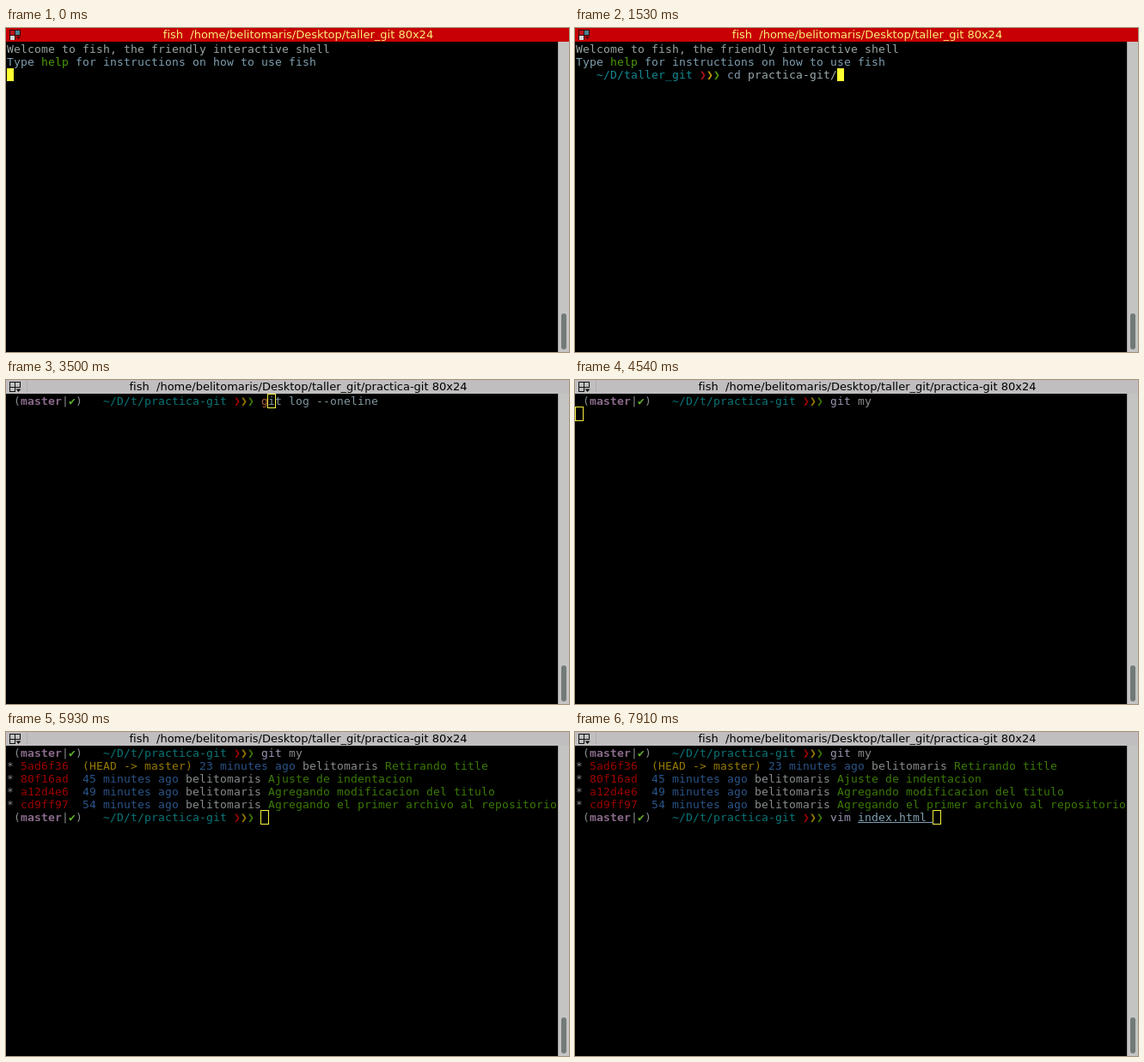
An HTML page that plays this animation: 655 by 378 pixels, repeating every 8 s.

```html
<!DOCTYPE html>
<html lang="es">
<head>
<meta charset="utf-8">
<title>Terminal</title>
<style>
html, body { margin: 0; width: 100%; height: 100%; overflow: hidden; background: #000; }
svg { display: block; }
text { white-space: pre; }
#title { font: 13px "DejaVu Sans", sans-serif; text-anchor: middle; }
#screen text { font: 13px "DejaVu Sans Mono", monospace; }
#screen .b { font-weight: bold; }
</style>
</head>
<body>
<svg width="655" height="378" viewBox="0 0 655 378">
  <rect width="655" height="378" fill="#000"/>
  <rect id="bar" width="655" height="16"/>
  <g id="iconOn" shape-rendering="crispEdges">
    <rect x="4" y="2" width="13" height="12" fill="#2a0a0c"/>
    <rect x="5" y="3" width="5" height="5" fill="#c01418"/>
    <rect x="11" y="3" width="5" height="5" fill="#4f8291"/>
    <rect x="5" y="9" width="5" height="5" fill="#d8d4d4"/>
    <rect x="11" y="9" width="6" height="5" fill="#c80003"/>
    <path d="M11 10h6l-3 3z" fill="#50080a"/>
  </g>
  <g id="iconOff">
    <path d="M11 13.5H4.500V2.500H16.500V8M4.500 8.500H16.500M10.500 2.500V13.500" fill="none" stroke="#111" shape-rendering="crispEdges"/>
    <path d="M11.500 10.500h6l-3 3.500z" fill="#111"/>
    <path d="M24.500 1V15" stroke="#a3a1a2" stroke-dasharray="1 1"/>
  </g>
  <text id="title" x="340" y="12"></text>
  <rect x="642" y="16" width="13" height="362" fill="#c4c4c3"/>
  <rect x="642" y="16" width="1" height="362" fill="#a2a2a1"/>
  <rect x="646" y="333" width="6" height="42" rx="3" fill="#727a78"/>
  <g id="screen"></g>
</svg>
<script>
const LOOP = 8000, CELL = 8, ROW = 15;
const USER = "belitomaris";
const HOME = `/home/${USER}/Desktop/taller_git`;
const REPO = HOME + "/practica-git";
const $ = id => document.getElementById(id);

const lit = { fg: "#9caaae", cmd: "#8399ad", hint: "#64767c", path: "#128a94",
  red: "#b81414", gold: "#c4a000", green: "#4e9a06" };
const dim = { fg: "#888c8e", cmd: "#9a96b0", hint: "#7f959e", path: "#087678",
  red: "#9c0000", gold: "#967a00", green: "#3b7a05", blue: "#2a5488",
  bad: "#b06038", purple: "#8a6a8a", tick: "#62b02a" };

const esc = s => s.replace(/&/g, "&amp;").replace(/</g, "&lt;").replace(/>/g, "&gt;");
const left = col => 1 + col * CELL;
const base = row => 29 + row * ROW;

// Text on the terminal grid: one character per cell.
function put(row, col, s, fill, cls = "") {
  if (!s) return "";
  const xs = [...s].map((_, i) => left(col + i)).join(" ");
  return `<text x="${xs}" y="${base(row)}" fill="${fill}" class="${cls}">${esc(s)}</text>`;
}

const underline = (row, col, n, fill) =>
  `<rect x="${left(col)}" y="${base(row) + 1}" width="${n * CELL}" height="1" fill="${fill}"/>`;

const arrows = (row, col, c) =>
  [c.red, c.gold, c.green].map((f, i) => put(row, col + i, "❯", f)).join("");

function welcome() {
  const soft = "#7f9fb0";
  return put(0, 0, "Welcome to fish, the friendly interactive shell", "#98a5a2") +
    put(1, 0, "Type", soft) + put(1, 5, "help", lit.green) +
    put(1, 10, "for instructions on how to use fish", soft);
}

const homePrompt = row => put(row, 3, "~/D/taller_git", lit.path) + arrows(row, 18, lit);

const repoPrompt = row =>
  put(row, 1, "(", dim.fg) + put(row, 2, "master", dim.purple, "b") +
  put(row, 8, "|", dim.fg) + put(row, 9, "✔", dim.tick) + put(row, 10, ")", dim.fg) +
  put(row, 14, "~/D/t/practica-git", dim.path) + arrows(row, 33, dim);

const commits = [
  ["5ad6f36", "(HEAD -> master)", 23, "Retirando title"],
  ["80f16ad", "", 45, "Ajuste de indentacion"],
  ["a12d4e6", "", 49, "Agregando modificacion del titulo"],
  ["cd9ff97", "", 54, "Agregando el primer archivo al repositorio"]
];

const log = () => commits.map(([hash, ref, age, msg], i) => {
  const row = i + 1, col = ref ? 28 : 11;
  return put(row, 0, "*", dim.fg) + put(row, 2, hash, dim.red) + put(row, 11, ref, dim.gold) +
    put(row, col, age + " minutes ago", dim.blue) + put(row, col + 15, USER, dim.fg) +
    put(row, col + 27, msg, dim.green);
}).join("");

// Command word, arguments and the grey suggestion after the cursor.
function command(row, col, { text, hint = "", bad, under }, c, focus) {
  const cut = text.indexOf(" ") < 0 ? text.length : text.indexOf(" ") + 1;
  const end = col + text.length;
  const argFill = under ? "#7fa0b0" : c.fg;
  return put(row, col, text.slice(0, cut).trimEnd(), bad ? dim.bad : c.cmd) +
    put(row, col + cut, text.slice(cut), argFill) +
    (under ? underline(row, col + cut, text.length - cut, argFill) : "") +
    put(row, end, hint.slice(0, 1), focus ? "#000" : c.hint) +
    put(row, end + 1, hint.slice(1), c.hint);
}

const type = (text, hint, more) => ({ line: { text, hint, ...more }, cur: null });

// Each step changes only the named parts of the state.
const steps = [
  [0, { focus: true, job: "fish", dir: HOME, view: "start", line: null, cur: [0, 2] }],
  [130, { view: "home", ...type("") }],
  [690, type("c", "", { bad: true })],
  [770, type("c", "lear", { bad: true })],
  [860, type("cd", "", { bad: true })],
  [1000, type("cd", " practica-git/")],
  [1530, type("cd practica-git/")],
  [1890, { job: "cd", cur: [0, 3] }],
  [1990, { cur: [] }],
  [2640, { job: "fish", dir: REPO, view: "blank", line: null }],
  [3300, { focus: false, view: "repo", ...type("") }],
  [3400, type("g", "", { bad: true })],
  [3500, type("g", "it log --oneline", { bad: true })],
  [3620, type("gi", "t log --oneline", { bad: true })],
  [3740, type("git", " log --oneline", { bad: true })],
  [3850, type("git", " log --oneline")],
  [3970, type("git ", "log --oneline")],
  [4210, type("git m")],
  [4300, type("git m", "y")],
  [4390, type("git my")],
  [4540, { cur: [0, 1] }],
  [4600, { job: "git" }],
  [4650, { view: "log", line: null, cur: [0, 5] }],
  [4710, { job: "fish" }],
  [5270, { view: "next", ...type("") }],
  [5370, type("c", "", { bad: true })],
  [5470, type("c", "lear", { bad: true })],
  [5930, type("")],
  [6250, type("v", "", { bad: true })],
  [6350, type("v", "im index.html", { bad: true })],
  [6450, type("vi", "m index.html", { bad: true })],
  [6640, type("vi", "m index.html")],
  [6740, type("vim", " index.html")],
  [6930, type("vim ", "index.html")],
  [7180, type("vim i", "ndex.html")],
  [7250, type("vim in", "dex.html")],
  [7320, type("vim in", "dex.html", { under: true })],
  [7910, type("vim index.html ", "", { under: true })]
];

let state = {};
const states = steps.map(([at, change]) => state = { ...state, ...change, at });

const doneLog = () => repoPrompt(0) + command(0, 37, { text: "git my" }, dim) + log();
const views = {
  start: { draw: welcome },
  home: { draw: () => welcome() + homePrompt(2), row: 2, col: 22 },
  blank: { draw: () => "" },
  repo: { draw: () => repoPrompt(0), row: 0, col: 37 },
  log: { draw: doneLog },
  next: { draw: () => doneLog() + repoPrompt(5), row: 5, col: 37 }
};

function cursor([col, row], focus) {
  if (col === undefined) return "";
  const x = col * CELL, y = 16 + row * ROW;
  return focus
    ? `<rect x="${x + 1}" y="${y + 1}" width="8" height="15" fill="#ffff32"/>`
    : `<rect x="${x + .5}" y="${y + .5}" width="9" height="16" fill="none" stroke="#f4f03c"/>`;
}

function draw(s) {
  const v = views[s.view];
  const cur = s.cur || [v.col + s.line.text.length, v.row];
  $("bar").setAttribute("fill", s.focus ? "#c80003" : "#c0bebf");
  $("title").setAttribute("fill", s.focus ? "#f8ee78" : "#000");
  $("title").textContent = `${s.job}  ${s.dir} 80x24`;
  $("iconOn").style.display = s.focus ? "" : "none";
  $("iconOff").style.display = s.focus ? "none" : "";
  $("screen").innerHTML = v.draw() + cursor(cur, s.focus) +
    (s.line ? command(v.row, v.col, s.line, s.focus ? lit : dim, s.focus) : "");
}

let shown;
const start = performance.now();
function tick() {
  const t = (performance.now() - start) % LOOP;
  const s = states.findLast(x => x.at <= t);
  if (s !== shown) draw(shown = s);
  requestAnimationFrame(tick);
}
tick();
</script>
</body>
</html>
```
